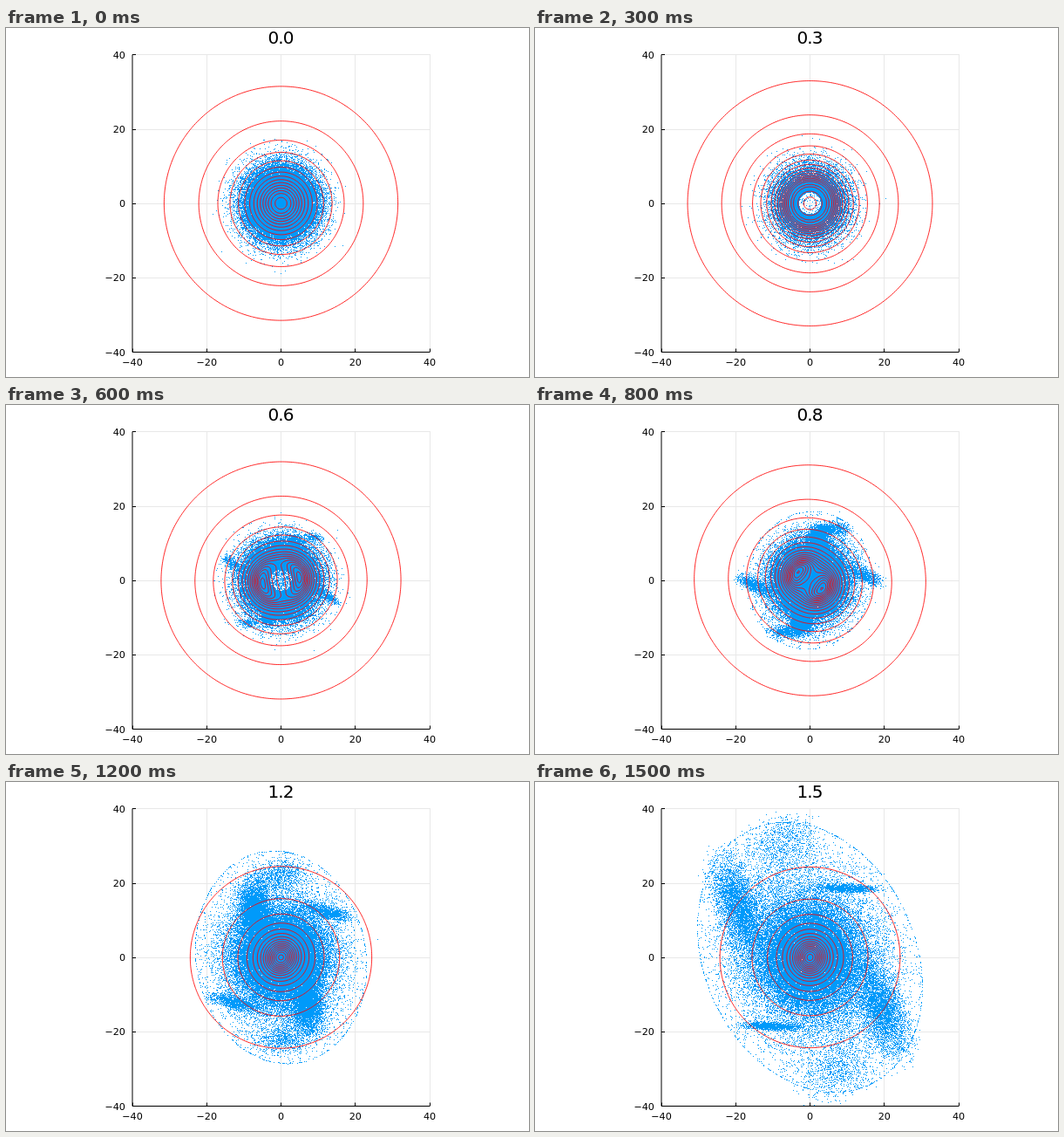
Write an HTML page with a canvas that moves like this. It is 600x400 px and loops after 1.6 s.

```html
<!DOCTYPE html>
<html lang="en">
<head>
<meta charset="utf-8">
<title>Particle disk with potential contours</title>
<style>
html, body { margin: 0; width: 100%; height: 100%; overflow: hidden; background: #fff; }
canvas, svg { position: absolute; left: 0; top: 0; width: 600px; height: 400px; }
text { font: 11.2px "DejaVu Sans", sans-serif; fill: #000; }
#title { font-size: 20px; letter-spacing: -0.9px; }
.axis { stroke: #000; stroke-width: 1; fill: none; }
</style>
</head>
<body>
<canvas id="view" width="600" height="400"></canvas>
<svg id="axes" viewBox="0 0 600 400">
  <path class="axis" d="M145 30.5V371.5H486"/>
  <text id="title" x="315" y="18" text-anchor="middle">0.0</text>
</svg>
<script>
const W = 600, H = 400, CX = 315.5, CY = 201, UNIT = 4.2625;
const STEPS = 16, STEP_MS = 100, TAU = Math.PI * 2, RAD = Math.PI / 180;
const px = x => CX + x * UNIT;
const py = y => CY - y * UNIT;

// Smooth rise from 0 at a to 1 at b.
function ramp(t, a, b) {
  const f = Math.min(1, Math.max(0, (t - a) / (b - a)));
  return f * f * (3 - 2 * f);
}

function rng(seed) {
  return () => {
    seed = seed + 0x6D2B79F5 | 0;
    let v = Math.imul(seed ^ seed >>> 15, 1 | seed);
    v = v + Math.imul(v ^ v >>> 7, 61 | v) ^ v;
    return ((v ^ v >>> 14) >>> 0) / 4294967296;
  };
}

// Arms come in opposite pairs: they turn with the disk until t = 1, then drift off straight.
const arms = [
  { x: 13.5, y: 8, vx: -7, vy: 21, spin: 125, len: 6.5, wid: 2.4, tilt: -22, dLen: 4, dWid: -2.4, dTilt: 40, n: 2300 },
  { x: .8, y: 12.3, vx: -40, vy: 2, spin: 40, len: 4.2, wid: 3.4, tilt: 80, dLen: 20, dWid: 5, dTilt: 60, n: 8500 },
  { x: 4, y: 16, vx: -22, vy: 30, spin: 60, len: 5, wid: 2.2, tilt: 0, dLen: 10, dWid: 10, dTilt: 40, n: 1400 }
];

function drawGrid(g) {
  g.fillStyle = '#fff';
  g.fillRect(0, 0, W, H);
  g.fillStyle = '#e8e8e8';
  for (const v of [-20, 0, 20, 40]) {
    g.fillRect(Math.floor(px(v)), 30, 1, 342);
    g.fillRect(145, Math.round(py(v) - .1), 341, 1);
  }
}

function drawParticles(g, t) {
  const img = g.getImageData(0, 0, W, H), data = img.data;
  const dot = (x, y) => {
    const i = Math.floor(px(x)), j = Math.floor(py(y));
    if (i < 146 || i > 485 || j < 31 || j > 370) return;
    const k = (j * W + i) * 4;
    data[k] = 0; data[k + 1] = 154; data[k + 2] = 250;
  };
  const gauss = rand => Math.sqrt(-2 * Math.log(1 - rand()));

  // Disk with a hole that opens and closes again
  const spread = 4.4 + 2 * ramp(t, .8, 1.5);
  const hole = 3 * ramp(t, 0, .3) * (1 - ramp(t, .6, .8));
  const thin = 1 - .6 * Math.exp(-(((t - .3) / .15) ** 2));
  const count = (60000 - 30000 * ramp(t, .6, 1.5)) * thin;
  let rand = rng(11);
  for (let i = 0; i < count; i++) {
    const r = spread * gauss(rand), a = rand() * TAU + 2.2 * t;
    const d = i % 60 ? Math.hypot(r, hole) : r;
    dot(d * Math.cos(a), d * Math.sin(a));
  }

  // Halo thrown outwards
  const age = Math.max(0, t - .5), grow = age ** 1.3;
  const c = Math.cos((40 + 50 * t) * RAD), s = Math.sin((40 + 50 * t) * RAD);
  rand = rng(23);
  for (let i = 0; i < 18000 * age; i++) {
    const r = Math.min(2.7, gauss(rand)), a = rand() * TAU;
    const u = r * (5 + 9 * grow) * Math.cos(a), v = r * (5 + 5.5 * grow) * Math.sin(a);
    dot(u * c - v * s, u * s + v * c);
  }

  arms.forEach((arm, k) => drawArm(arm, t, rng(37 + k), dot));
  g.putImageData(img, 0, 0);
}

function drawArm(arm, t, rand, dot) {
  const dt = t - 1, late = Math.max(0, dt), turn = Math.min(0, dt) * arm.spin;
  const dist = Math.hypot(arm.x, arm.y) + 5 * Math.min(0, dt);
  const dir = Math.atan2(arm.y, arm.x) + turn * RAD;
  const x = dist * Math.cos(dir) + arm.vx * late, y = dist * Math.sin(dir) + arm.vy * late;
  const size = .4 + .6 * ramp(t, .4, 1);
  const len = (arm.len + arm.dLen * late) * size, wid = (arm.wid + arm.dWid * late) * size;
  const tilt = (arm.tilt + arm.dTilt * late + turn / 4) * RAD;
  const c = Math.cos(tilt), s = Math.sin(tilt);
  const bell = () => (rand() + rand() + rand() - 1.5) / 1.1;
  for (let i = 0; i < arm.n * ramp(t, .4, 1); i++) {
    const u = bell() * len, v = bell() * wid, side = i % 2 ? -1 : 1;
    dot(side * (x + u * c - v * s), side * (y + u * s + v * c));
  }
}

const N = 137, CELL = .5, EDGE = -34, POW = 1.3, PARTS = 24;
const depth = new Float64Array(N * N);

// Potential of a two-lobed ring; point-symmetric, so half the grid is enough.
function fillDepth(t) {
  const ring = 5.4 * ramp(t, 0, .3) - 4 * ramp(t, .65, 1.1);
  const soft = 4.5 - 3.1 * ramp(t, 0, .3) + 1.6 * ramp(t, .75, 1) - .7 * ramp(t, 1, 1.25);
  const lobes = .9 * ramp(t, .3, .8), angle = (675 * t - 395) * RAD;
  const core = soft ** (2 * POW);
  const masses = Array.from({ length: PARTS }, (_, i) => {
    const a = i / PARTS * TAU;
    return [ring * Math.cos(a), ring * Math.sin(a), (1 + lobes * Math.cos(2 * (a - angle))) / PARTS];
  });
  for (let k = 0; k <= N * N >> 1; k++) {
    const x = EDGE + k % N * CELL, y = -EDGE - Math.floor(k / N) * CELL;
    let sum = 0;
    for (const [mx, my, m] of masses) {
      const d = (x - mx) ** 2 + (y - my) ** 2;
      sum += m * Math.pow(Math.pow(d, POW) + core, -.5 / POW);
    }
    depth[k] = depth[N * N - 1 - k] = sum;
  }
}

function drawContours(g, t) {
  const dip = Math.exp(-(((t - .35) / .25) ** 2));
  const gap = .0134 - .0014 * dip + .0093 * ramp(t, .65, 1.25) ** 1.6;
  const first = .0185 + gap;
  const corners = [[0, 0], [1, 0], [1, 1], [0, 1]];
  fillDepth(t);
  g.beginPath();
  for (let j = 0; j < N - 1; j++) for (let i = 0; i < N - 1; i++) {
    const v = corners.map(([a, b]) => depth[(j + b) * N + i + a]);
    const lo = Math.max(0, Math.ceil((Math.min(...v) - first) / gap));
    const hi = Math.floor((Math.max(...v) - first) / gap);
    for (let k = lo; k <= hi; k++) {
      const level = first + k * gap, hits = [];
      for (let c = 0; c < 4; c++) {
        const n = (c + 1) % 4;
        if (v[c] < level === v[n] < level) continue;
        const f = (level - v[c]) / (v[n] - v[c]), p = corners[c], q = corners[n];
        hits.push([
          px(EDGE + (i + p[0] + (q[0] - p[0]) * f) * CELL),
          py(-EDGE - (j + p[1] + (q[1] - p[1]) * f) * CELL)
        ]);
      }
      for (let h = 0; h + 1 < hits.length; h += 2) {
        g.moveTo(...hits[h]);
        g.lineTo(...hits[h + 1]);
      }
    }
  }
  g.strokeStyle = '#f00';
  g.lineWidth = .85;
  g.stroke();
}

function buildStep(i) {
  const c = document.createElement('canvas');
  c.width = W;
  c.height = H;
  const g = c.getContext('2d', { willReadFrequently: true });
  drawGrid(g);
  drawParticles(g, i / 10);
  drawContours(g, i / 10);
  return c;
}

function addAxes() {
  const svg = document.getElementById('axes');
  const add = (tag, attrs, text = '') => {
    const el = document.createElementNS('http://www.w3.org/2000/svg', tag);
    for (const k in attrs) el.setAttribute(k, attrs[k]);
    el.textContent = text;
    svg.append(el);
  };
  for (let v = -40; v <= 40; v += 20) {
    const label = String(v).replace('-', '\u2212');
    const x = Math.floor(px(v)) + .5, y = Math.round(py(v) - .1) + .5;
    add('path', { class: 'axis', d: `M${x} 371.5v-4M145 ${y}h4` });
    add('text', { x: px(v), y: 387, 'text-anchor': 'middle' }, label);
    add('text', { x: 137, y: Math.round(py(v)) + 4, 'text-anchor': 'end' }, label);
  }
}

addAxes();
const steps = Array.from({ length: STEPS }, (_, i) => buildStep(i));
const view = document.getElementById('view').getContext('2d');
const title = document.getElementById('title');
const start = performance.now();
let shown = -1;

function play() {
  const i = Math.floor((performance.now() - start) / STEP_MS) % STEPS;
  if (i !== shown) {
    view.drawImage(steps[i], 0, 0);
    title.textContent = (i / 10).toFixed(1);
    shown = i;
  }
  requestAnimationFrame(play);
}
play();
</script>
</body>
</html>
```
